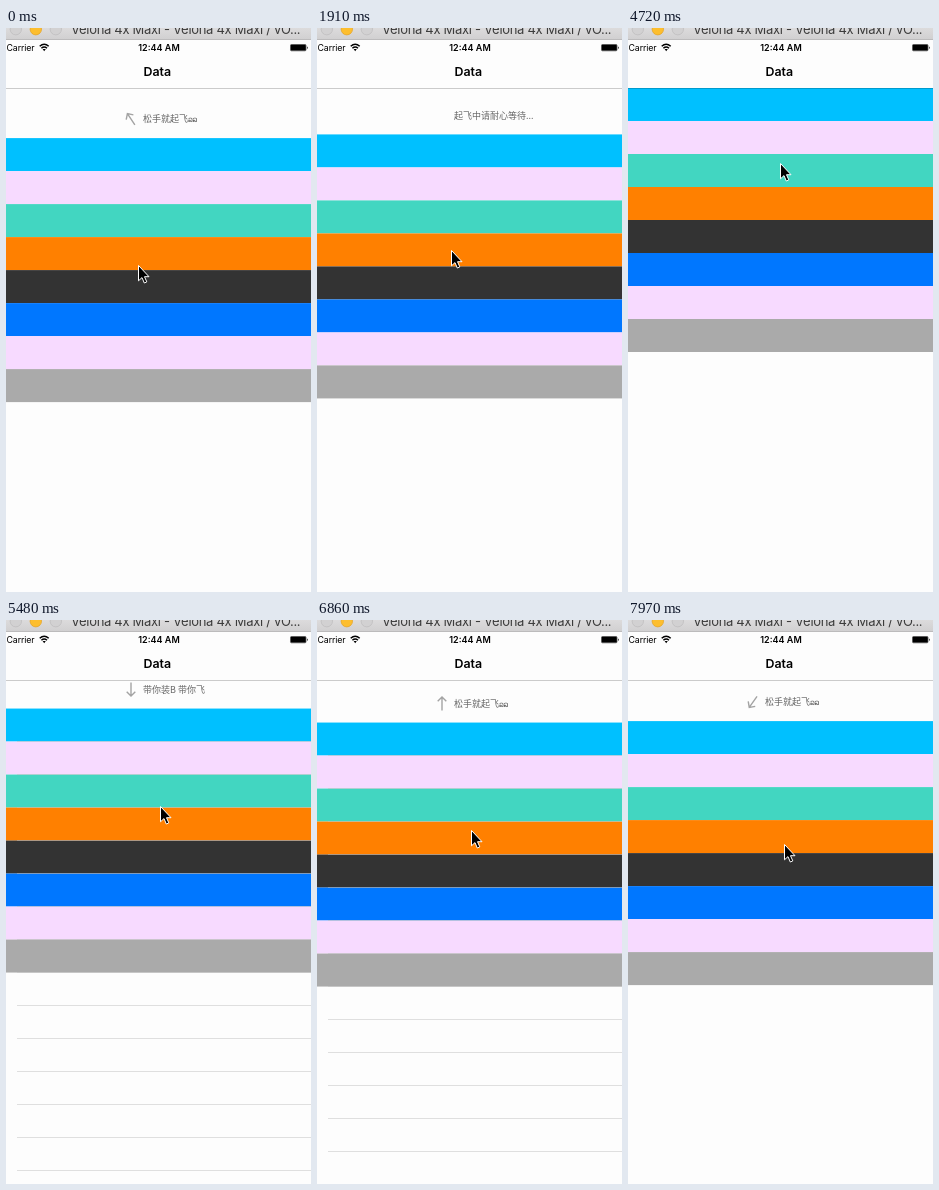
These frames come from a looping animation (305x564 px, 8 s). An HTML page:

```html
<!DOCTYPE html>
<html lang="zh">
<head>
<meta charset="utf-8">
<title>Pull to refresh</title>
<style>
html, body { margin: 0; width: 100%; height: 100%; overflow: hidden; background: #fdfdfd; }
svg { display: block; width: 100vw; height: 100vh; }
text { font-family: Inter, sans-serif; white-space: pre; }
#hint { font: 9px "Noto Sans CJK SC", "Noto Sans CJK", "DejaVu Sans", sans-serif; fill: #666; }
#deco { font: 7.5px "DejaVu Sans", sans-serif; letter-spacing: -.4px; fill: #555; }
</style>
</head>
<body>
<svg viewBox="0 0 305 564">
  <defs>
    <linearGradient id="chrome" x2="0" y2="1">
      <stop stop-color="#dcdbdc"/><stop offset="1" stop-color="#d0cfd0"/>
    </linearGradient>
  </defs>
  <rect width="305" height="564" fill="#fdfdfd"/>
  <g id="table">
    <path id="arrow" d="M0 7V-6.5M-4.3 -2.2L0 -6.5L4.3 -2.2" fill="none" stroke="#a3a3a3" stroke-width="1.4"/>
    <text id="hint" x="137" y="-15.8"></text>
    <text id="deco" x="182" y="-16">ລລ</text>
    <g id="rows"></g>
  </g>
  <g id="lines" fill="#bbb" fill-opacity=".45"></g>

  <rect width="305" height="60" fill="#fdfdfd"/>
  <rect y="60" width="305" height="1" fill-opacity=".2"/>
  <rect width="305" height="12" fill="url(#chrome)"/>
  <rect y="11" width="305" height="1" fill="#bcbbbc"/>
  <g stroke-width=".8">
    <circle cx="9.8" cy="1.2" r="5.7" fill="#d2d1d2" stroke="#bfbebf"/>
    <circle cx="29.8" cy="1.2" r="5.7" fill="#fdbe2e" stroke="#e5a52a"/>
    <circle cx="49.8" cy="1.2" r="5.7" fill="#d2d1d2" stroke="#bfbebf"/>
  </g>
  <text x="65" y="6" font-size="13" letter-spacing="-.3" fill="#3c3c3c">Velona 4x Maxi - Velona 4x Maxi / vO...</text>

  <text x="0.5" y="23" font-size="8.8" letter-spacing="-.1">Carrier</text>
  <path d="M33.7 18.3Q38.2 14.2 42.7 18.3M35.4 20.2Q38.2 17.7 41 20.2" fill="none" stroke="#000" stroke-width="1.5"/>
  <path d="M36.6 21L38.2 23.2L39.8 21Z"/>
  <text x="153" y="23" font-size="9" font-weight="600" text-anchor="middle">12:44 AM</text>
  <rect x="284.5" y="16.5" width="15.5" height="6.3" rx="1" stroke="#555" stroke-width=".8"/>
  <path d="M301 18.2Q302.6 19.7 301 21.2Z"/>
  <text x="151.3" y="48" font-size="12.4" font-weight="600" text-anchor="middle">Data</text>

  <path id="cursor" d="M.5 .5V15.8L4 12.6L6.3 18L8.8 16.9L6.5 11.7H11Z" stroke="#fff" stroke-linejoin="round"/>
</svg>
<script>
const $ = id => document.getElementById(id);
const LOOP = 8000, ROW = 33, READY = 97.5, FLIP = 250;
const LOAD_START = 1910, LOAD_END = 4000;
const colors = ['#00c0ff', '#f7daff', '#42d6c1', '#ff8000', '#333', '#0077ff', '#f7daff', '#aaa'];

// Gestures: start, end, then the list top and the pointer x, y they lead to
const rest = [110.1, 132, 237];
const moves = [
  [10, 1030, 120.9, 134, 249],
  [1250, 1440, 107, 134, 224],
  [1860, 2200, 97.45, 140, 195],
  [2200, 2550, 97.45, 146, 168],
  [3970, 4260, 60, 147, 163],
  [4380, 4720, 60, 152, 135],
  [4770, 5470, 88.55, 154, 186],
  [5530, 6440, 102.55, 154, 210],
  [6910, 7510, 74, 155, 163],
  [7640, 7970, 101.1, 156, 224]
];
// The arrow turns up and down in alternation, starting with up
const flips = [-180, LOAD_START, 6050, 7080, 7900];

function ease(p) {
  p = Math.min(1, Math.max(0, p));
  return p * p * (3 - 2 * p);
}

function pose(t) {
  return moves.reduce((from, [start, end, ...to]) => {
    const p = ease((t - start) / (end - start));
    return from.map((v, i) => v + (to[i] - v) * p);
  }, rest);
}

function arrowAngle(t) {
  const n = flips.filter(f => f <= t).length - 1;
  const p = ease((t - flips[n]) / FLIP);
  return -180 * (n % 2 ? p : 1 - p);
}

function addRect(parent, attrs) {
  const r = document.createElementNS('http://www.w3.org/2000/svg', 'rect');
  for (const k in attrs) r.setAttribute(k, attrs[k]);
  parent.append(r);
}
colors.forEach((fill, i) => addRect($('rows'), { y: i * ROW, width: 305, height: ROW, fill }));
for (let i = 1; i < 16; i++) addRect($('lines'), { x: 11, y: i * ROW - 1, width: 294, height: 1 });

const move = (id, x, y, turn = 0) => $(id).setAttribute('transform', `translate(${x} ${y}) rotate(${turn})`);
const show = (id, on) => $(id).setAttribute('visibility', on ? 'visible' : 'hidden');

function draw(t) {
  const [y, cx, cy] = pose(t);
  const loading = t >= LOAD_START && t < LOAD_END;
  const ready = !loading && y > READY;
  move('table', 0, y);
  move('lines', 0, Math.round(y));
  move('arrow', 125, -19, arrowAngle(t));
  move('cursor', Math.round(cx), Math.round(cy));
  $('hint').textContent = loading ? '起飞中请耐心等待...' : ready ? '松手就起飞' : '带你装B 带你飞';
  show('arrow', !loading);
  show('deco', ready);
  // Hairlines only survive at some subpixel offsets
  show('lines', y % 1 >= .5);
}

function tick() {
  draw(performance.now() % LOOP);
  requestAnimationFrame(tick);
}
tick();
</script>
</body>
</html>
```
